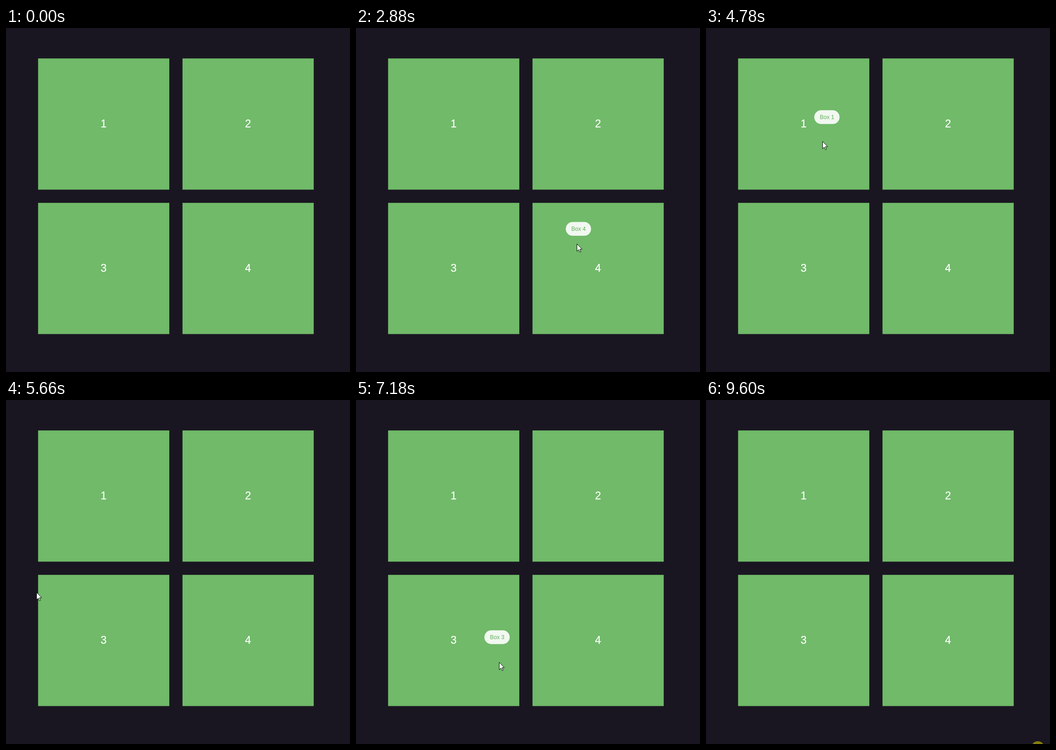
Animation of 748 by 748 pixels, one loop 9.73 s. Source, as an HTML page:

```html
<!DOCTYPE html>
<html lang="en">
<head>
<meta charset="utf-8">
<title>Following tooltip</title>
<style>
  html, body { margin: 0; width: 100%; height: 100%; overflow: hidden; background: #1a1621; }
  svg { display: block; width: 100vw; height: 100vh; }
  text { font-family: "Liberation Sans", Arial, sans-serif; text-anchor: middle; }
  .box rect { fill: #70ba69; }
  .box text { fill: #fff; stroke: #fff; stroke-width: .25px; font-size: 23.4px; }
  #tip rect { fill: #fff; fill-opacity: .9; }
  #tip text { fill: #62ae5b; font-size: 12.3px; }
</style>
</head>
<body>
<svg id="stage" viewBox="0 0 748 748">
  <g id="boxes"></g>
  <g id="tip">
    <rect x="-27.5" y="-15" width="55" height="30" rx="15"/>
    <text id="label" x=".3" y="4"></text>
  </g>
  <path id="cursor" d="M.5 .5V16.5L4.2 13L6.7 18.5L9 17.5L6.6 12H11.5Z" fill="#fff" stroke="#000"/>
  <circle id="click" cx="721.5" cy="756" r="14" fill="#85800f"/>
</svg>
<script>
const LOOP = 9730, ENTER = 630, LEAVE = 9360, CLICK = 9600;
const LAG = 60;               // the tooltip trails the pointer
const OFFSET = { x: 3, y: -31.5 };
const GRID = { x: 69.8, y: 66.2, size: 285.3, pitch: 314 };
const $ = id => document.getElementById(id);

// Turning points of the pointer: arrival time, x, y, pause
const stops = [
  [ENTER, 734, 720], [740, 731, 487], [1200, 604, 303, 265], [1630, 594, 311],
  [2200, 479, 428], [2440, 493, 447], [2880, 480, 469, 120], [4020, 328, 322],
  [4425, 305, 282], [4690, 264, 222], [4980, 226, 335], [5310, 34, 354, 120],
  [5660, 66, 418], [6330, 279, 475, 200], [6660, 290, 488, 270], [7180, 311, 570],
  [7310, 345, 612], [7480, 417, 620], [7660, 386, 600, 650], [LEAVE, 665, 747]
];
const path = stops.flatMap(([t, x, y, pause]) =>
  pause ? [{ t, x, y }, { t: t + pause, x, y }] : [{ t, x, y }]);
const last = path.length - 1;

const slope = (i, k) => (path[i + 1][k] - path[i][k]) / (path[i + 1].t - path[i].t);

// Monotone tangent: flat at turning points and rests
function tangent(i, k) {
  if (i === 0) return slope(0, k);
  if (i === last) return slope(i - 1, k);
  const a = slope(i - 1, k), b = slope(i, k);
  return a * b <= 0 ? 0 : 2 * a * b / (a + b);
}

function pointer(time) {
  const t = Math.max(ENTER, Math.min(LEAVE, time));
  const i = Math.max(0, path.findIndex(p => p.t >= t) - 1);
  const a = path[i], b = path[i + 1];
  const span = b.t - a.t, u = (t - a.t) / span, v = 1 - u;
  const at = k =>
    v * v * (1 + 2 * u) * a[k] + u * u * (3 - 2 * u) * b[k] +
    span * u * v * (v * tangent(i, k) - u * tangent(i + 1, k));
  return { x: at("x"), y: at("y") };
}

const boxes = [0, 1, 2, 3].map(i => ({
  x: GRID.x + GRID.pitch * (i % 2),
  y: GRID.y + GRID.pitch * Math.floor(i / 2)
}));

$("boxes").innerHTML = boxes.map(({ x, y }, i) =>
  `<g class="box" transform="translate(${x} ${y})">
    <rect width="${GRID.size}" height="${GRID.size}"/>
    <text x="142.4" y="149.8">${i + 1}</text>
  </g>`).join("");

const within = (v, from) => v >= from && v < from + GRID.size;
const boxAt = p => boxes.findIndex(b => within(p.x, b.x) && within(p.y, b.y));

const show = (id, on) => $(id).setAttribute("visibility", on ? "visible" : "hidden");
const place = (id, x, y) => $(id).setAttribute("transform", `translate(${x} ${y})`);

function draw(t) {
  const active = t >= ENTER && t < LEAVE;
  const p = pointer(t), tail = pointer(t - LAG);
  const hit = active ? boxAt(p) : -1;
  show("cursor", active);
  place("cursor", Math.round(p.x), Math.round(p.y));
  show("tip", hit >= 0);
  place("tip", tail.x + OFFSET.x, tail.y + OFFSET.y);
  $("label").textContent = "Box " + (hit + 1);
  show("click", t >= CLICK);
}

const start = performance.now();
function tick() {
  draw((performance.now() - start) % LOOP);
  requestAnimationFrame(tick);
}
tick();
</script>
</body>
</html>
```
